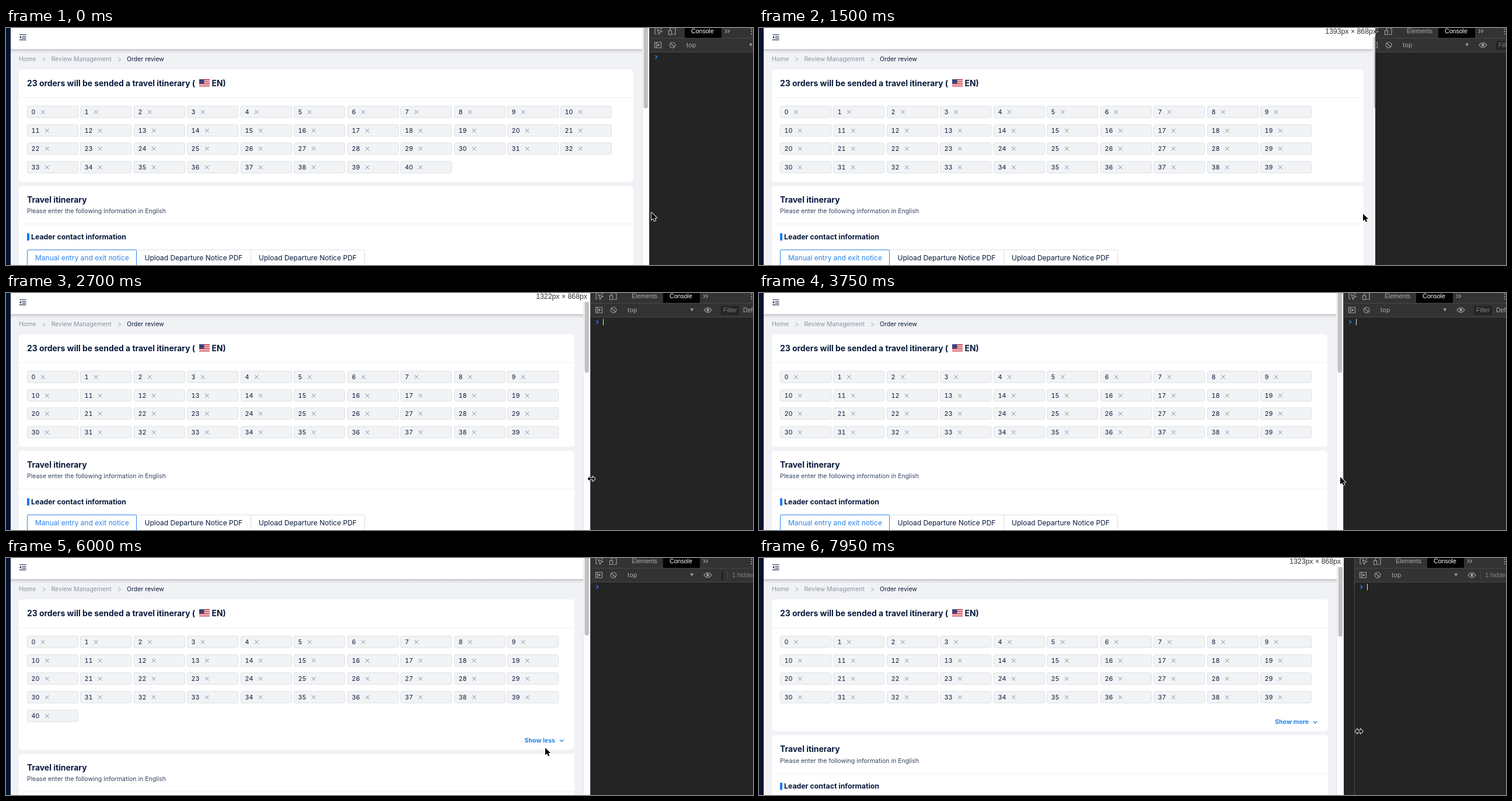
Animation of 1280x407 px, one loop 8 s. Source, as an HTML page:

```html
<!DOCTYPE html>
<html lang="en">
<head>
<meta charset="utf-8">
<title>Order review</title>
<style>
  html, body { margin: 0; width: 100%; height: 100%; overflow: hidden; background: #242424; }
  svg { display: block; }
  text { font-family: Inter, "Noto Sans", sans-serif; fill: #08193c; white-space: pre; }
  .small { font-size: 10.5px; }
  .body { font-size: 12px; }
  .title { font-size: 13.9px; font-weight: 700; }
  .section { font-size: 12.3px; font-weight: 700; }
  .num { font-size: 10.8px; font-variant-numeric: tabular-nums; }
  .muted { fill: #8c93a3; }
  .link { fill: #1f85e8; font-size: 10.6px; font-weight: 700; text-anchor: end; }
  .dev text, #size { font-family: "Liberation Sans", Arial, sans-serif; font-size: 10.6px; fill: #a9adb2; }
  .dev .on { fill: #fff; }
  .dev .dim { fill: #7f8388; }
  #size { font-size: 12.3px; fill: #333; text-anchor: end; }
  .icon { fill: none; stroke: #9a9da1; stroke-width: 1.2; }
  .card { fill: #fff; }
  .rule { fill: #f0f0f2; }
  .cursor { fill: #000; stroke: #fff; stroke-width: 1.8; paint-order: stroke; stroke-linejoin: round; }
</style>
</head>
<body>
<svg id="stage" width="1280" height="407" viewBox="0 0 1280 407">
  <defs>
    <linearGradient id="shade" x2="0" y2="1">
      <stop offset="0" stop-color="#1a2433" stop-opacity=".27"/>
      <stop offset=".4" stop-color="#1a2433" stop-opacity=".08"/>
      <stop offset="1" stop-color="#1a2433" stop-opacity="0"/>
    </linearGradient>
  </defs>
  <rect width="1280" height="407" fill="#242424"/>

  <g id="dev" class="dev">
    <rect x="-1" width="400" height="41" fill="#333"/>
    <path d="M-1 17.5H400M-1 41.5H400" stroke="#474747"/>
    <path d="M-.5 0V407" stroke="#484848"/>
    <path class="icon" d="M12 10H9V0H20V3M13 3l8 3-3.4 1.4L16 11z"/>
    <path class="icon" d="M35 4V0H44V3M32.5 4.5h5v7h-5zM39 11h5V3"/>
    <g id="tabs">
      <text id="elements" x="70" y="9.3">Elements</text>
      <rect x="124" width="63" height="17" fill="#000"/>
      <text class="on" x="135" y="9.3">Console</text>
      <path class="icon" d="M193 2.5l3 3-3 3M197.5 2.5l3 3-3 3"/>
    </g>
    <path class="icon" d="M8.5 24.5h11V34h-11zM11.5 24.5V34"/>
    <path d="M13.5 26.5l4 2.7-4 2.7z" fill="#9a9da1"/>
    <circle class="icon" cx="39" cy="29.3" r="4.8"/>
    <path class="icon" d="M35.6 26l6.8 6.7"/>
    <text x="63" y="32.8" style="font-size:11px;letter-spacing:.4px">top</text>
    <path d="M170.5 26.5h5.5l-2.75 5.5z" fill="#9a9da1"/>
    <path class="icon" d="M194 29.3q6.5-8 13 0q-6.5 8-13 0z"/>
    <circle cx="200.5" cy="29.3" r="2.2" fill="#a5a8ac"/>
    <g id="filter">
      <rect x="223" y="22" width="31" height="15.5" fill="#242424"/>
      <text class="dim" x="227" y="33">Filter</text>
      <text x="261" y="32.8">Default levels</text>
    </g>
    <rect id="slot" x="224" y="22" width="2.5" height="15.5" fill="#1e1e1e"/>
    <g id="prompt">
      <path d="M9.5 46.8l3.2 3-3.2 3" fill="none" stroke="#367cf1" stroke-width="1.5"/>
      <path id="caret" d="M21.5 44.5v11" stroke="#e4e4e4"/>
    </g>
  </g>
  <g class="dev">
    <g id="hidden">
      <path d="M1236.5 23v13" stroke="#4a4a4a"/>
      <text class="dim" x="1244" y="32.8">1 hidden</text>
    </g>
    <path d="M1277.5 1v2m0 2v2m0 2v2" stroke="#9a9da1" stroke-width="2"/>
  </g>

  <svg id="page" height="407">
    <rect width="1280" height="407" fill="#fdfdfd"/>
    <rect id="back" x="8" height="407" fill="#f1f2f5"/>
    <rect id="head" x="8" height="36.5" fill="#fff"/>
    <rect id="headShade" x="8" y="36.5" height="7" fill="url(#shade)"/>
    <path id="edge" d="M.5 0V407" stroke="#e6e6e8"/>
    <rect width="8" height="407" fill="#021334"/>
    <path d="M23 11.5H34.5M27.5 14.5h7M27.5 17.3h7M23 20.3H34.5" stroke="#1c2c4d" stroke-width="1.2"/>
    <path d="M23 15.9l3-2.3v4.6z" fill="#1c2c4d"/>

    <text class="small muted" x="22" y="57.3">Home</text>
    <text class="small muted" x="77.5" y="57.3">Review Management</text>
    <text class="small" x="207" y="57.3">Order review</text>
    <path d="M62.5 51l5 3-5 3M192 51l5 3-5 3" fill="none" stroke="#a3a9b5"/>

    <rect id="orders" class="card" x="22" y="71" rx="5"/>
    <text class="title" x="36" y="100.3">23 orders will be sended a travel itinerary (</text>
    <g transform="translate(331 88)">
      <rect width="18" height="12.5" fill="#f4eeee"/>
      <path d="M0 .9H18M0 4.4H18M0 7.9H18M0 11.5H18" stroke="#c9303e" stroke-width="1.7"/>
      <rect width="8.5" height="7" fill="#39437c"/>
    </g>
    <text class="title" x="352.5" y="100.3">EN)</text>
    <rect id="rule1" class="rule" x="22" y="119" height="1"/>
    <g id="chips"></g>
    <g id="more">
      <text id="moreText" class="link" x="-48" y="285">Show more</text>
      <path d="M-40 280.3l3.2 3.4 3.2-3.4" fill="none" stroke="#1f85e8" stroke-width="1.3"/>
    </g>

    <g id="trip">
      <rect id="tripCard" class="card" x="22" y="271" height="180" rx="5"/>
      <text class="title" x="36" y="299.8">Travel itinerary</text>
      <text class="small" x="36" y="318.3" fill-opacity=".82">Please enter the following information in English</text>
      <rect id="rule2" class="rule" x="22" y="336" height="1"/>
      <rect x="36" y="352.5" width="4" height="12.5" fill="#1677ff"/>
      <text class="section" x="43" y="363.2">Leader contact information</text>
      <rect x="36.5" y="381" width="578" height="28" rx="2" fill="#fff" stroke="#dcdee2"/>
      <path d="M419.5 381v28" stroke="#dcdee2"/>
      <rect x="36.5" y="381" width="187" height="28" rx="2" fill="#fff" stroke="#2a83ec"/>
      <text class="body" x="50" y="399" style="fill:#2a83ec">Manual entry and exit notice</text>
      <text class="body" x="237.5" y="399">Upload Departure Notice PDF</text>
      <text class="body" x="433" y="399">Upload Departure Notice PDF</text>
    </g>
    <rect id="thumb" y="-6" width="7.5" rx="3.7" fill="#c1c1c1"/>
  </svg>

  <g id="sizeTip">
    <rect id="sizeBox" height="15.5" fill="#fff"/>
    <text id="size" y="10"> </text>
  </g>
  <path id="arrow" class="cursor" d="M0 0v12.5l3-2.8 2 4.6 2.2-.9-2-4.5h4z"/>
  <path id="resize" class="cursor" d="M-6.5 0l4-4v2.9h5v-2.9l4 4-4 4v-2.9h-5v2.9z"/>
</svg>

<script>
const LOOP = 8000, STEP = 150, COUNT = 41, TRAVEL = 101;
const $ = id => document.getElementById(id);
const set = (id, attrs) => { for (const k in attrs) $(id).setAttribute(k, attrs[k]); };
const show = (id, on) => { $(id).style.display = on ? "" : "none"; };
const move = (id, x, y = 0) => set(id, { transform: `translate(${x} ${y})` });
const within = (t, a, b) => t >= a && t < b;
const part = (t, a, b) => Math.min(1, Math.max(0, (t - a) / (b - a)));

// Fast start, long settling
const glide = (t, start) =>
  (1 - Math.exp(-2.6 * part(t, start, 2700))) / (1 - Math.exp(-2.6));
const pull = t => Math.max(0, t - 7650) / 300;

// The panel follows the pointer; the page lags behind it
const panelAt = t => Math.round(1103 - TRAVEL * glide(t, 900) + 19 * pull(t));
const pageAt = t => Math.round(1090 - TRAVEL * glide(t, 1250) + pull(t));

// Pointer stops between the two drags: time, x, y
const stops = [
  [3600, 1003, 319], [4800, 943, 292], [5100, 925, 282], [5700, 925, 282],
  [6000, 924, 326], [6450, 926, 314], [7050, 1003, 295], [7350, 1005, 298]
];

function pointerAt(t) {
  if (t < 450) return [1106, 317];
  const next = stops.findIndex(s => s[0] > t);
  if (next < 1) return [panelAt(t + 100) + 1, t < 3600 ? 319 : 297.5];
  const a = stops[next - 1], b = stops[next], p = part(t, a[0], b[0]);
  return [1, 2].map(i => Math.round(a[i] + (b[i] - a[i]) * p));
}

$("chips").innerHTML = Array.from({ length: COUNT }, (_, n) => {
  const x = n < 10 ? 24 : 31;
  return `<g id="chip${n}"><rect x=".5" y=".5" width="87" height="20" rx="2.5" fill="#f1f3f5" stroke="#dde0e5"/>
    <text class="num" x="7.5" y="14.3">${n}</text>
    <path d="M${x} 7.5l6.5 6.5m0-6.5l-6.5 6.5" stroke="#808a9b"/></g>`;
}).join("");

function placeChips(cols, open) {
  for (let n = 0; n < COUNT; n++) {
    const row = Math.floor(n / cols);
    move("chip" + n, 36 + Math.round(n % cols * 91.44), 133.5 + Math.round(row * 31.65));
    show("chip" + n, row < 4 || open);
  }
}

function draw(t) {
  const panel = panelAt(t), width = pageAt(t);
  const clip = Math.min(width + 12, Math.round(panel * .34 + (width + 13) * .66));
  const right = width - 15;
  const folded = t >= 3900, open = within(t, 5100, 6300);
  const shift = open ? 65 : folded ? 33.3 : 0;

  // Page
  set("page", { width: clip });
  for (const id of ["back", "head", "headShade"]) set(id, { width: width - 8 });
  for (const id of ["orders", "tripCard", "rule1", "rule2"]) set(id, { width: right - 22 });
  set("orders", { height: 193 + shift });
  move("edge", width);
  move("trip", 0, shift);
  placeChips(right >= 1056 ? 11 : 10, open);
  show("more", folded);
  move("more", width, open ? 31.7 : 0);
  $("moreText").textContent = open ? "Show less" : "Show more";
  set("thumb", { x: width + 2.5, height: 144 - shift / 16 - (width < 1000) });

  // Viewport size tip
  show("sizeTip", within(t, 900, 3600) || t >= 7800);
  set("sizeBox", { x: width - 84, width: Math.min(95, clip - width + 84) });
  set("size", { x: width + 7 });
  $("size").textContent = `${Math.round(1322 + (width - 989) * 1.143)}px × 868px`;

  // Side panel
  move("dev", panel);
  const narrow = panel > 1060;
  show("elements", !narrow);
  move("tabs", narrow ? -64 : 0);
  show("filter", !folded);
  show("hidden", folded);
  show("slot", folded && panel < 1010);
  show("prompt", !within(t, 1350, 1650));
  const focused = within(t, 600, 5400) || t >= 7800;
  show("caret", focused && (t + 450) % 1050 < 600);

  // Pointer
  const resizing = within(t, 450, 1350) || within(t, 1650, 3750) || t >= 7350;
  show("resize", resizing);
  show("arrow", !resizing);
  move(resizing ? "resize" : "arrow", ...pointerAt(t));
}

let last = -1;
function tick() {
  const t = Math.floor(performance.now() % LOOP / STEP) * STEP;
  if (t !== last) draw(last = t);
  requestAnimationFrame(tick);
}
tick();
</script>
</body>
</html>
```
